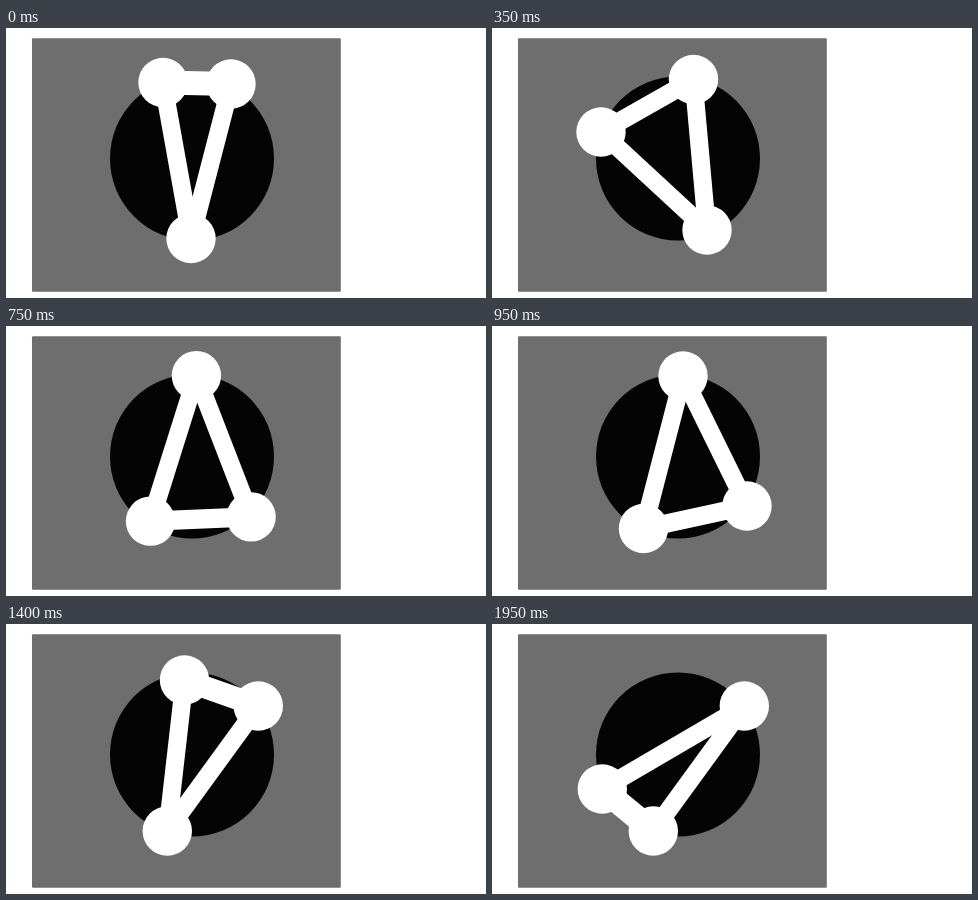
Write an HTML page that moves like this. It is 480x270 px and loops after 2 s.

```html
<!DOCTYPE html>
<html lang="en">
<head>
<meta charset="utf-8">
<title>Three nodes on a ring</title>
<style>
html, body { margin: 0; width: 100%; height: 100%; overflow: hidden; background: #fff; }
svg { display: block; width: 480px; height: 270px; }
</style>
</head>
<body>
<svg viewBox="0 0 480 270">
  <rect x="26" y="10.3" width="308.8" height="253.5" rx="1" fill="#6e6e6e"/>
  <circle cx="186" cy="130.5" r="82" fill="#040404"/>
  <g id="shape" fill="#fff" stroke="#fff"></g>
</svg>
<script>
const LOOP = 2000, STEP = 50, CX = 186, CY = 130.5;

// Key points of each node as [ms, x, y]; a node rests after its last one.
const paths = [
  [[0, 157, 54.5], [350, 109, 104], [600, 135.5, 186], [950, 151.5, 202.5], [1400, 161.3, 207]],
  [[0, 225, 56], [350, 201.5, 51.5], [600, 190, 49.5], [950, 191, 50],
   [1400, 178.5, 56], [1650, 109.5, 97.5], [1950, 110.3, 165]],
  [[0, 185, 210.5], [350, 215, 202], [600, 237.5, 196.5], [950, 255, 180], [1400, 252.3, 82]]
];

// Monotone cubic through the key values.
function curve(times, values) {
  const last = values.length - 1;
  const slope = i => (values[i + 1] - values[i]) / (times[i + 1] - times[i]);
  const tangent = i => {
    if (i === 0) return slope(0);
    if (i === last) return last && times[last] < 1500 ? 0 : slope(last - 1);
    const a = slope(i - 1), b = slope(i);
    return a * b <= 0 ? 0 : 2 * a * b / (a + b);
  };
  return t => {
    if (t >= times[last]) return values[last];
    const i = times.findIndex(k => k > t) - 1;
    const h = times[i + 1] - times[i], u = (t - times[i]) / h, v = 1 - u;
    return values[i] * (1 + 2 * u) * v * v + values[i + 1] * u * u * (3 - 2 * u)
      + h * u * v * (tangent(i) * v - tangent(i + 1) * u);
  };
}

// Keeps the angle continuous across the half turn.
function unwrap(angles) {
  const turn = 2 * Math.PI, out = [];
  for (const a of angles) {
    const before = out.length ? out[out.length - 1] : a;
    out.push(a - turn * Math.round((a - before) / turn));
  }
  return out;
}

// Nodes travel around the ring, so they are blended by angle and radius.
const tracks = paths.map(keys => {
  const times = keys.map(k => k[0]);
  const angle = curve(times, unwrap(keys.map(([, x, y]) => Math.atan2(y - CY, x - CX))));
  const radius = curve(times, keys.map(([, x, y]) => Math.hypot(x - CX, y - CY)));
  return t => ({
    x: CX + radius(t) * Math.cos(angle(t)),
    y: CY + radius(t) * Math.sin(angle(t))
  });
});

const shape = document.getElementById("shape");
function set(el, attrs) {
  for (const key in attrs) el.setAttribute(key, attrs[key]);
}
function add(name, attrs) {
  const el = document.createElementNS("http://www.w3.org/2000/svg", name);
  set(el, attrs);
  return shape.appendChild(el);
}

const bars = tracks.map(() => add("line", {}));
const nodes = tracks.map(() => add("circle", { r: 24.7, stroke: "none" }));

function draw(t) {
  const points = tracks.map(at => at(t));
  points.forEach((p, i) => {
    const q = points[(i + 1) % points.length];
    const length = Math.hypot(p.x - q.x, p.y - q.y);
    set(nodes[i], { cx: p.x, cy: p.y });
    // Short bars are thicker.
    set(bars[i], {
      x1: p.x, y1: p.y, x2: q.x, y2: q.y,
      "stroke-width": 18 + Math.max(0, 110 - length) * 0.14
    });
  });
}

const start = performance.now();
function tick() {
  const t = (performance.now() - start) % LOOP;
  draw(Math.floor(t / STEP) * STEP);
  requestAnimationFrame(tick);
}
tick();
</script>
</body>
</html>
```
